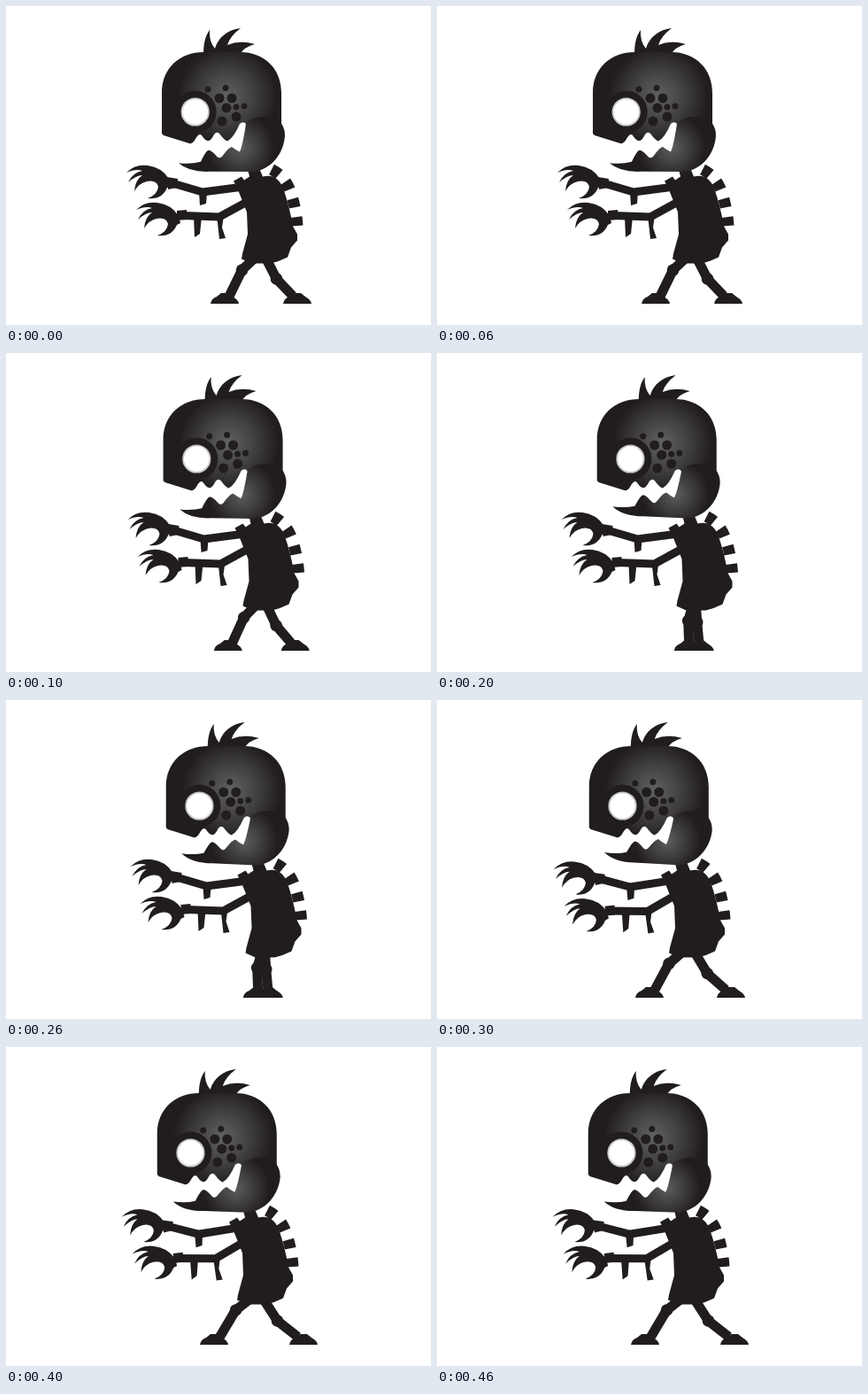
An HTML page for the animation above (500 ms loop, 480 by 360 pixels).

```html
<!DOCTYPE html>
<html lang="en">
<head>
<meta charset="utf-8">
<title>Walking zombie</title>
<style>
  html, body { margin: 0; width: 100%; height: 100%; overflow: hidden; background: #fff; }
  svg { display: block; width: 100vw; height: 100vh; }
  .line { fill: none; stroke: #211d1e; stroke-linejoin: round; }
  .dots { stroke-linecap: round; }
</style>
</head>
<body>
<svg viewBox="0 0 480 360" fill="#211d1e">
  <defs>
    <radialGradient id="skull" gradientUnits="userSpaceOnUse" cx="250" cy="102" r="56">
      <stop offset="0" stop-color="#626263"/>
      <stop offset=".5" stop-color="#434142"/>
      <stop offset="1" stop-color="#211d1e"/>
    </radialGradient>
    <radialGradient id="chin" gradientUnits="userSpaceOnUse" cx="265" cy="160" r="38">
      <stop offset="0" stop-color="#5e5d5e"/>
      <stop offset="1" stop-color="#211d1e"/>
    </radialGradient>
    <path id="hand" d="M184 195Q176 182 160 180Q146 178 136 188Q147 183 154 186Q143 188 138 199Q147 191 154 191Q146 196 145 209Q150 200 159 198Q170 196 172 204Q171 213 160 217Q176 219 182 205L186 203Z"/>
    <path id="foot" d="M-16 0Q-15-6-9-8L-4-12H4L9-8Q15-5 16 0Z"/>
  </defs>

  <g class="leg"><path class="line" stroke-width="11"/><circle r="6.8"/><use href="#foot"/></g>
  <g class="leg"><path class="line" stroke-width="11"/><circle r="6.8"/><use href="#foot"/></g>

  <g id="torso">
    <path d="M257 197L266 192 269 196 275 192 272 180H285L290 192Q306 188 313 205Q320 225 324 248L329 257V264L322 272 318 283Q308 288 299 290H277L266 285 267 279 273 257 272 232 262 207Z"/>
    <path class="line" stroke-width="13" stroke-dasharray="10 11" d="M300 184Q316 192 322 211T329 248"/>
  </g>

  <g id="arms">
    <path class="line" stroke-width="9" d="M268 204L222 210 188 200M274 220L241 238 199 236.500"/>
    <path d="M218 210H227L226 223 219 225Z M212 238H221L219 257 213 261Z M238 236H246L244 250 248 262 241 263Z"/>
    <path d="M182 193l12 2-1 10-10 2z M193 231l11-1v11l-11 1z"/>
    <use href="#hand"/>
    <use href="#hand" x="11" y="42"/>
  </g>

  <g id="head">
    <path d="M223 56C223 42 225 34 230 27Q229 40 236 48C240 35 250 27 265 25Q253 34 250 44Q264 38 281 43Q269 46 264 55Z"/>
    <path fill="url(#skull)" d="M176 144V98C176 70 196 52 224 52H264C292 52 311 71 311 98V136L298 148 276 140 270 132Q267 130 264 133Q257 149 250 152.500Q247 152 241 144Q238 141 235 145Q231 153 228 152Q225 152 221 146Q218 143 214 150Q211 156 207 155L178 146Z"/>
    <circle cx="213.700" cy="119.500" r="24"/>
    <circle cx="213.700" cy="119.500" r="15.200" fill="#fff" stroke="#c9c9c9" stroke-width="1.800"/>
    <path class="line dots" stroke-width="11" d="M241 104h0m14 0h0m-6 11h0m-5 15h0m16-5h0"/>
    <path class="line dots" stroke-width="7" d="M228 94h0m20-1.500h0m12 21.500h0m9-1h0"/>
  </g>

  <path id="jaw" fill="url(#chin)" d="M195 177.500Q209 179 220 176Q226 163 229 163Q232 163 238 169.500Q241 173 244 170Q252 159 255 159Q259 162 264 164.500Q267 159 271 133C276 125 299 121 309 130Q315 137 315 146C314 166 300 185 279 187H230Q207 188 195 177.500Z"/>
</svg>

<script>
const frameMs = 100;
const sways = [0, 1.5, 4.5, -4, -5];     // how far the body leans forward or back
const strides = [41, 38, 6.5, 46, 50.5]; // half the distance between the feet

const part = id => document.getElementById(id);
const legs = [...document.querySelectorAll('.leg')];
const set = (node, attrs) => {
  for (const key in attrs) node.setAttribute(key, attrs[key]);
};

function poseLeg(leg, side, sway, stride) {
  const [limb, knee, foot] = leg.children;
  const hipX = 287 + sway * .8 + side * (1 + stride * .14);
  const kneeX = 286 + sway * .6 + side * (2.3 + stride * .42);
  const kneeY = 303 + side * stride * .12;
  const footX = 288 + sway * .5;
  set(limb, { d: `M${hipX} 285L${kneeX} ${kneeY} ${footX + side * stride * .87} 327` });
  set(knee, { cx: kneeX, cy: kneeY });
  set(foot, { x: footX + side * stride, y: 336 });
}

function draw(now) {
  const step = Math.floor(now / frameMs) % sways.length;
  const sway = sways[step];
  const bite = 1.7 * (1 - Math.cos(2 * Math.PI * (step - .3) / sways.length));
  const headMove = `translate(${sway * 1.05})`;

  set(part('head'), { transform: headMove });
  set(part('jaw'), { transform: `${headMove} rotate(${bite} 290 145)` });
  set(part('torso'), { transform: `translate(${sway} .5)` });
  set(part('arms'), { transform: `translate(${sway}) rotate(${Math.min(0, sway) * .35} 262 207)` });
  legs.forEach((leg, i) => poseLeg(leg, i ? 1 : -1, sway, strides[step]));
}

const start = performance.now();
(function tick() {
  draw(performance.now() - start);
  requestAnimationFrame(tick);
})();
</script>
</body>
</html>
```
